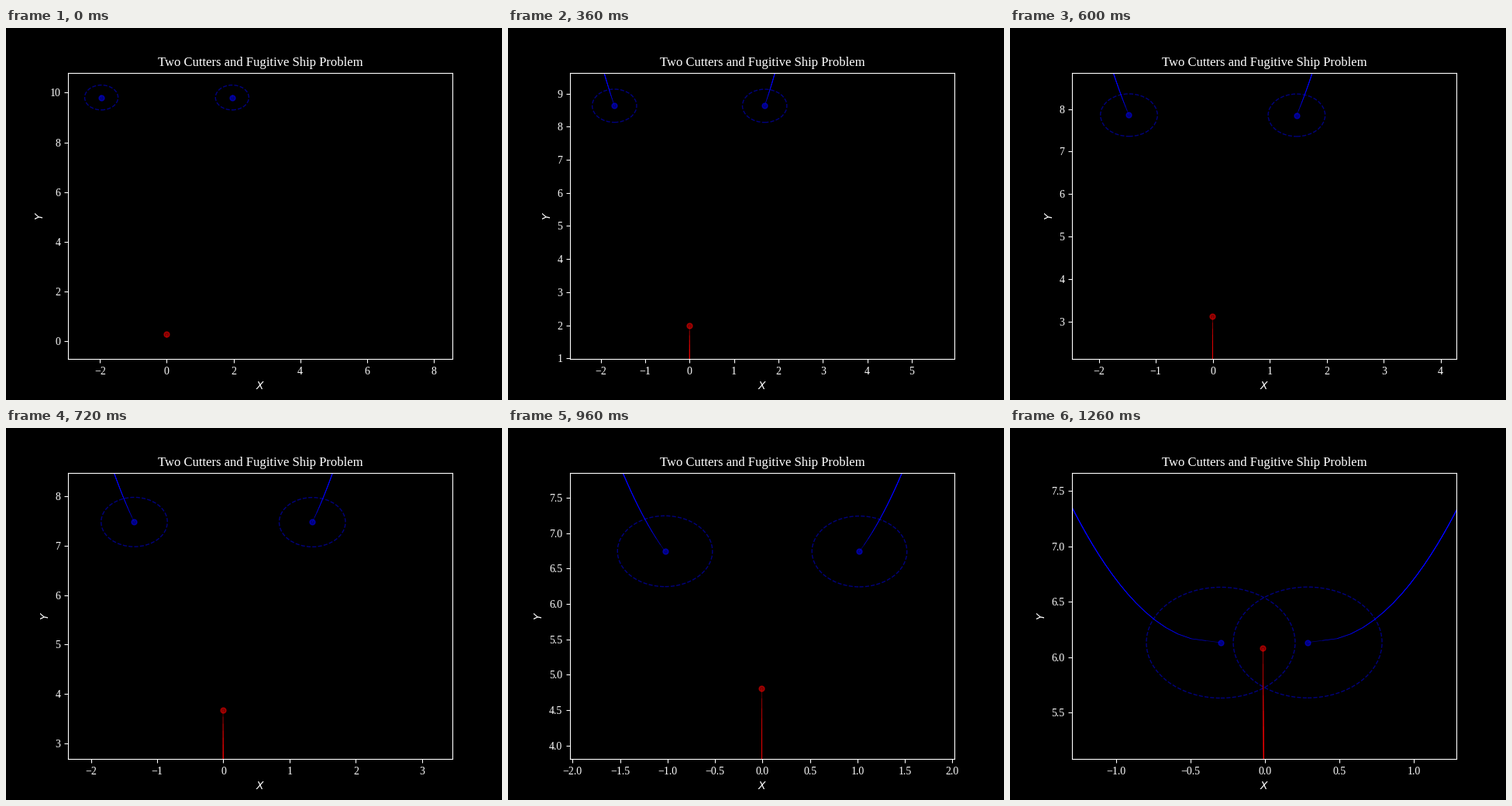
A matplotlib script that plays this animation: 640 by 480 pixels, repeating every 8.12 s.

```python
import numpy as np
import matplotlib.pyplot as plt
from matplotlib.animation import FuncAnimation
from matplotlib.collections import LineCollection
from matplotlib.patches import Circle

CUTTER_STEP = np.array([[0.1002], [0.10035]])
SHIP_STEP = 0.1 * np.sqrt(2)
DRIFT = 7.8e-6      # the ship bends slightly to the left
REACH = 0.5
STEPS = 44          # simulation steps in the whole chase
ALPHA = 0.5
TICK = 20           # ms per drawn frame
FRAMES = 8120 // TICK


def chase():
    """Positions [step, body, xy]; bodies are left cutter, right cutter, ship."""
    pos = np.array([[-2.0, 10.0], [2.0, 10.0], [0.0, 0.0]])
    path = [pos.copy()]
    for n in range(1, STEPS + 1):
        gap = np.linalg.norm(pos[:2] - pos[2], axis=1)
        if gap.min() > REACH:
            pos[2] = -DRIFT * n ** 2, SHIP_STEP * n
        aim = pos[2] - pos[:2]
        pos[:2] += CUTTER_STEP * aim / np.linalg.norm(aim, axis=1)[:, None]
        path.append(pos.copy())
    return np.array(path)


plt.style.use("dark_background")
plt.rcParams["font.family"] = "Liberation Serif"

path = chase()
fig, ax = plt.subplots(figsize=(6.4, 4.8), dpi=100)
ax.set_title("Two Cutters and Fugitive Ship Problem")
ax.set_xlabel("$X$")
ax.set_ylabel("$Y$")

BLUE, RED = (0, 0, 1), (1, 0, 0)
COLORS = [BLUE, BLUE, RED]

trails = [ax.add_collection(LineCollection([], colors=[c], linewidths=0.5,
                                           alpha=ALPHA), autolim=False)
          for c in COLORS]
dots = [ax.plot([], [], "o", color=c, ms=5, alpha=ALPHA)[0] for c in COLORS]
rings = [ax.add_patch(Circle((0, 0), REACH, fill=False, ec=BLUE, ls="--",
                             lw=1, alpha=ALPHA)) for _ in range(2)]


def draw(i):
    # the chase advances every 30 ms, then holds
    n = min((2 * i + 1) // 3 + 2, STEPS)
    pos = path[n]
    for body in range(3):
        dots[body].set_data(pos[body, :1], pos[body, 1:])
        # every step lays the whole track down again, so old parts grow solid
        trails[body].set_segments([path[1:end + 1, body]
                                   for end in range(2, n + 1)])
    for ring, center in zip(rings, pos):
        ring.set_center(center)
    low = pos.min(axis=0) - 1
    span = np.ptp(pos, axis=0).max() + 2
    ax.set_xlim(low[0], low[0] + span)
    ax.set_ylim(low[1], low[1] + span)
    return []


anim = FuncAnimation(fig, draw, frames=FRAMES, interval=TICK,
                     init_func=lambda: draw(0), repeat=True, repeat_delay=0)
plt.show()
```
